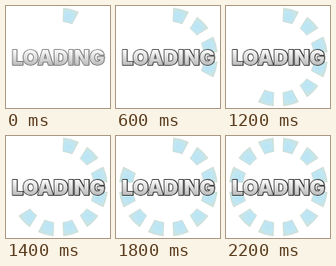
Animation of 131 by 128 pixels, one loop 2400 ms. Source, as an HTML page:

```html
<!DOCTYPE html>
<html lang="en">
<head>
<meta charset="utf-8">
<title>Loading</title>
<style>
  html, body { margin: 0; width: 100%; height: 100%; overflow: hidden; background: #fff; }
  svg { display: block; }
  text { font: 900 25.5px Inter, sans-serif; text-anchor: middle; stroke-linejoin: round; }
</style>
</head>
<body>
<svg width="131" height="128" viewBox="0 0 131 128">
  <defs>
    <radialGradient id="ice" gradientUnits="userSpaceOnUse" cx="-1" cy="-52" r="14">
      <stop offset="0" stop-color="#b9e4f5"/>
      <stop offset=".45" stop-color="#c0e6f2"/>
      <stop offset="1" stop-color="#d3e3d6"/>
    </radialGradient>
    <linearGradient id="steel" gradientUnits="userSpaceOnUse" x1="0" y1="55" x2="0" y2="75">
      <stop offset=".1" stop-color="#f6f6f6"/>
      <stop offset="1" stop-color="#b8b8b8"/>
    </linearGradient>
  </defs>
  <g id="ring" transform="translate(66 64)" fill="url(#ice)" stroke="#c3d0c4" stroke-width=".6"></g>
  <text id="shadow" x="66.2" y="74.2" fill="#111" stroke="#111" stroke-width="2">LOADING</text>
  <text x="65.8" y="73.7" fill="url(#steel)" stroke="#555" stroke-width="1.2" paint-order="stroke">LOADING</text>
</svg>
<script>
const COUNT = 12, STEP = 200, OUTER = 61.7, INNER = 45;
const rad = deg => deg * Math.PI / 180;
const point = (r, deg) => `${r * Math.sin(rad(deg))} ${-r * Math.cos(rad(deg))}`;
const shape = `M${point(OUTER, -9)}A${OUTER} ${OUTER} 0 0 1 ${point(OUTER, 9)}` +
  `L${point(INNER, 7.5)}A${INNER} ${INNER} 0 0 0 ${point(INNER, -7.5)}Z`;

const ring = document.getElementById('ring');
const shadow = document.getElementById('shadow');
const segments = Array.from({ length: COUNT }, (_, i) => {
  const path = document.createElementNS('http://www.w3.org/2000/svg', 'path');
  path.setAttribute('d', shape);
  path.setAttribute('transform', `rotate(${15 + i * 30})`);
  return ring.appendChild(path);
});

const start = performance.now();
function draw(now) {
  const last = Math.floor(Math.max(0, now - start) / STEP) % COUNT;
  segments.forEach((s, i) => s.style.display = i <= last ? '' : 'none');
  // The soft shadow builds up with every step.
  shadow.style.opacity = 1 - 0.65 ** (last + 1);
  requestAnimationFrame(draw);
}
draw(start);
</script>
</body>
</html>
```
